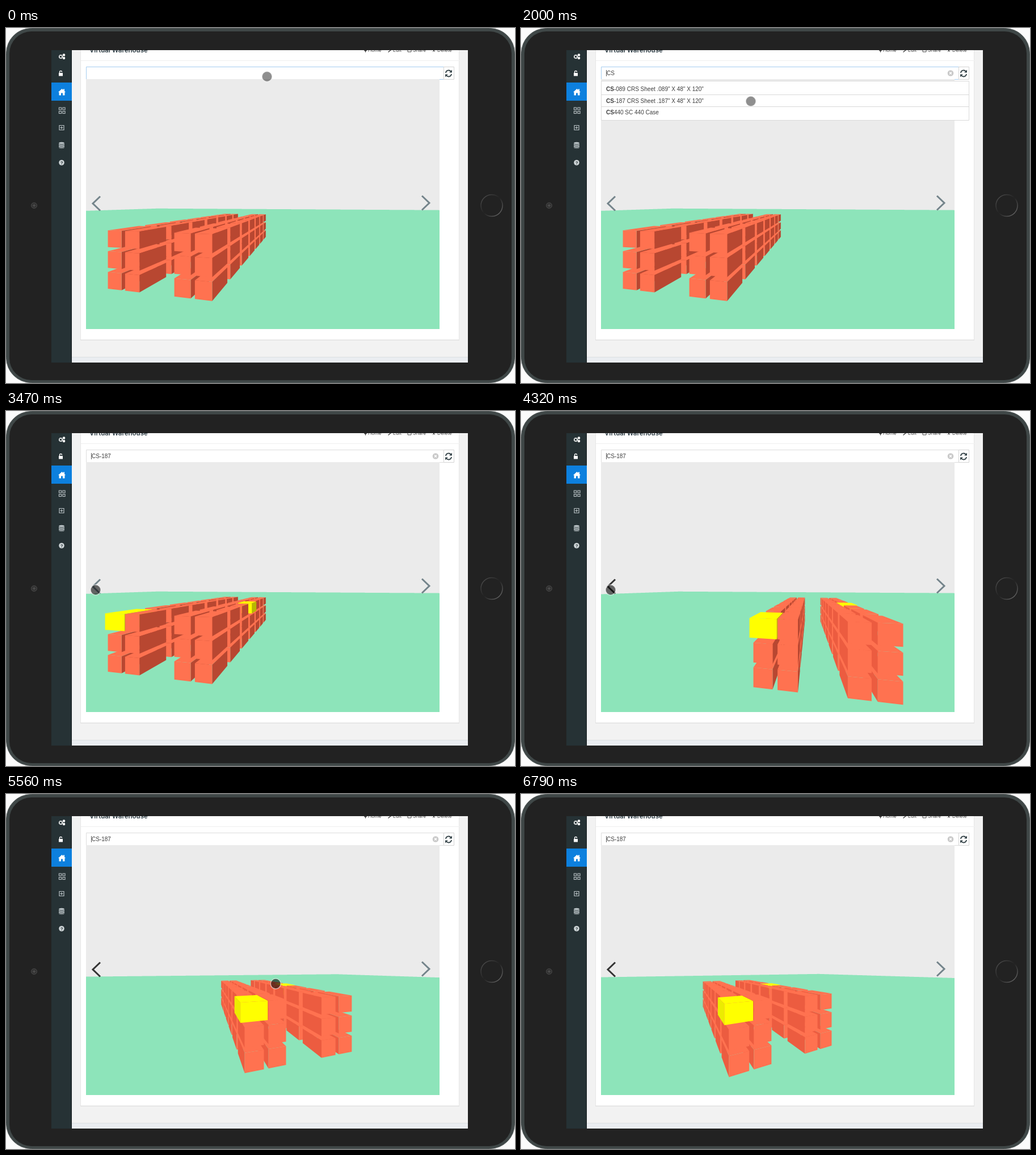
An HTML page with a canvas for the animation above (7.57 s loop, 897 by 625 pixels).

```html
<!DOCTYPE html>
<html lang="en">
<head>
<meta charset="utf-8">
<title>Virtual Warehouse</title>
<style>
  html, body { margin: 0; width: 100%; height: 100%; overflow: hidden; background: #fbfbfb; }
  svg, canvas { position: absolute; left: 0; top: 0; }
  canvas { left: 141px; top: 90px; }
  text { font: 10px "Liberation Sans", Arial, sans-serif; fill: #3c3c3c; }
  .title { font: 600 11.5px Inter, sans-serif; fill: #2b3a42; }
  .menu { font: 8.5px Inter, sans-serif; fill: #444; }
  .line { fill: none; stroke: #b9c2c5; stroke-width: 1.2; }
  .chevron { fill: none; stroke: #74848b; stroke-width: 3; }
</style>
</head>
<body>
<svg width="897" height="625">
  <defs>
    <clipPath id="screen"><path d="M80 39h734v550H80z"/></clipPath>
    <linearGradient id="knob" x2="0" y2="1">
      <stop stop-color="#333"/><stop offset=".5" stop-color="#555"/>
      <stop offset=".65" stop-color="#ddd"/><stop offset="1" stop-color="#777"/>
    </linearGradient>
    <linearGradient id="ring" x2="1" y2="1">
      <stop stop-color="#555"/><stop offset=".5" stop-color="#222"/><stop offset="1" stop-color="#777"/>
    </linearGradient>
  </defs>
  <!-- tablet -->
  <path fill="url(#knob)" d="M0 130h5v55H0zM892 430h5v55h-5z"/>
  <rect x=".5" y=".5" width="896" height="624" rx="44" fill="#3f4747" stroke="#565d5d"/>
  <rect x="6" y="6" width="885" height="614" rx="39" fill="#222"/>
  <circle cx="49.5" cy="312.5" r="5" fill="#333" stroke="#494949"/>
  <path d="M47 312.500h5M49.500 310v5" stroke="#555"/>
  <circle cx="856" cy="312.500" r="19" fill="none" stroke="url(#ring)" stroke-width="1.500"/>
  <!-- page -->
  <g clip-path="url(#screen)">
    <path fill="#f2f2f2" d="M80 39h734v550H80z"/>
    <path fill="#eaedf1" d="M116 579h698v10H116z"/>
    <path stroke="#dcdfe2" d="M116 579.500h698"/>
    <path fill="#fff" stroke="#e6e6e6" d="M131.500 30h667v519h-667z"/>
    <path stroke="#dedede" d="M131 549.500h668"/>
    <path stroke="#efefef" d="M132 57.500h667"/>
    <text class="title" x="147" y="43">Virtual Warehouse</text>
    <g class="menu">
      <text class="menu" x="638" y="42">Home</text><text class="menu" x="682" y="42">Edit</text>
      <text class="menu" x="717" y="42">Share</text><text class="menu" x="760" y="42">Delete</text>
      <path fill="#444" d="M631 39h5l-1 2h-1v2h-1v-2h-1zM673 42l5-4 1 1-5 4z"/>
      <path fill="none" stroke="#444" d="M708 38v4h6v-3M752 38l4 4M756 38l-4 4"/>
    </g>
    <!-- sidebar -->
    <path fill="#263235" d="M80 39h36v550H80z"/>
    <path stroke="#151c1e" d="M115.500 39v550"/>
    <path fill="#0d80de" d="M80 96h36v32H80z"/>
    <g fill="none" stroke="#fff" stroke-width="2">
      <circle cx="96.500" cy="50.500" r="2.700" stroke-dasharray="1.700 .4"/>
      <circle cx="102" cy="47.500" r="1.300"/><circle cx="102" cy="53" r="1.300"/>
    </g>
    <path fill="#fff" d="M93 79h7v5.500h-7z"/>
    <path d="M94.500 79v-1.500a2 2 0 0 1 4 0" fill="none" stroke="#fff" stroke-width="1.300"/>
    <path fill="#fff" d="M92 113l6.500-6 2.500 2v-1.500h2v3.500l2 2h-1.500v5.500h-3.500v-4h-3v4h-3.500V113z"/>
    <path class="line" d="M93.500 140h4v4h-4zM100 140h4v4h-4zM93.500 146.500h4v4h-4zM100 146.500h4v4h-4z"/>
    <path class="line" d="M94 171.500h8v8h-8zM98 173v5M95.500 175.500h5"/>
    <path fill="#b9c2c5" d="M93 203c0-3 10-3 10 0v7c0 3-10 3-10 0z"/>
    <path fill="none" stroke="#263235" d="M93 203.500c1 2 9 2 10 0M93 206.500c1 2 9 2 10 0M93 209.500c1 2 9 2 10 0"/>
    <circle cx="98" cy="237" r="4.800" fill="#cfd6d8"/>
    <text x="95.700" y="240" style="font-size:8px;font-weight:700;fill:#263235">?</text>
    <!-- search bar -->
    <path id="field" fill="#fff" d="M141.500 68.500h630v22h-630z"/>
    <path fill="#fff" stroke="#d4d4d4" d="M771.500 68.500h18v22h-18z"/>
    <g fill="none" stroke="#39474c" stroke-width="1.900">
      <path d="M775 79a5 5 0 0 1 9-2.500M785 81a5 5 0 0 1-9 2.500"/>
    </g>
    <path fill="#39474c" d="M786 73.500v5h-5zM774 86.500v-5h5z"/>
    <path id="caret" stroke="#555" d="M150.500 74v11"/>
    <text id="query" x="151" y="83"></text>
    <g id="clear">
      <circle cx="757" cy="79.500" r="5.300" fill="#c9c9c9"/>
      <path d="M755 77.500l4 4M759 77.500l-4 4" stroke="#fff" stroke-width="1.400"/>
    </g>
  </g>
</svg>
<canvas id="scene" width="623" height="440"></canvas>
<svg width="897" height="625">
  <path id="left" class="chevron" d="M166 296.500L153 309l13 12.500"/>
  <path class="chevron" d="M733 295.500L746 308l-13 12.500"/>
  <g id="menu">
    <path fill="#fff" stroke="#d9d9d9" d="M141.500 93.500h648v69h-648zM142 117.500h647M142 138.500h647"/>
    <text x="150" y="110.500"><tspan font-weight="700">CS</tspan>-089 CRS Sheet .089" X 48" X 120"</text>
    <text x="150" y="131.500"><tspan font-weight="700">CS</tspan>-187 CRS Sheet .187" X 48" X 120"</text>
    <text x="150" y="151.500"><tspan font-weight="700">CS</tspan>440 SC 440 Case</text>
  </g>
  <circle id="cursor" r="9" stroke="#fff" stroke-opacity=".55" stroke-width="1.500"/>
</svg>
<script>
const LOOP = 7570, FOCAL = 286.7, EYE = 5.08, BACK = 7.9;
const RED = { front: '#ff7250', left: '#ec5c40', right: '#b84731' };
const YELLOW = { front: '#ffff00', left: '#ecec00', right: '#b8b800' };
const $ = id => document.getElementById(id);
const ctx = $('scene').getContext('2d');
const show = (id, on) => $(id).style.display = on ? '' : 'none';
const mix = (a, b, p) => a + (b - a) * p;
const smooth = p => p * p * (3 - 2 * p);

// Progress 0..1 in n equal jumps, the first at a and the last at b
const steps = (t, a, b, n) =>
  t < a ? 0 : Math.min(1, (Math.floor((t - a) * (n - 1) / (b - a) + 1e-6) + 1) / n);

// Fast swipe that slows down at the end
function swipe(t) {
  const p = steps(t, 5330, 6020, 10);
  if (!p) return 0;
  return p < 0.4 ? 0.11 + (p - 0.1) * 2.08 : 1 - 0.265 * ((1 - p) / 0.6) ** 3;
}

const columns = [-2.25, -1, 2.27, 3.52].map((x, id) => ({ x, id }));

function drawScene(camX, yaw, found) {
  const s = Math.sin(yaw), c = Math.cos(yaw);
  const project = ([x, y, z]) => {
    const dx = x - camX, dz = z + BACK, depth = dz * c - dx * s;
    return [311.5 + FOCAL * (dx * c + dz * s) / depth, 220 + FOCAL * y / depth];
  };
  const face = (color, ...points) => {
    ctx.fillStyle = color;
    ctx.beginPath();
    points.forEach(p => ctx.lineTo(...project(p)));
    ctx.fill();
  };
  const box = (x0, x1, y0, z0, paint) => {
    const y1 = y0 + 1, z1 = z0 + 2;
    const side = (x, color) => face(color, [x, y0, z0], [x, y0, z1], [x, y1, z1], [x, y1, z0]);
    face(paint.front, [x0, y0, z0], [x1, y0, z0], [x1, y0, z1], [x0, y0, z1]);
    if (camX < x0) side(x0, paint.left);
    if (camX > x1) side(x1, paint.right);
    face(paint.front, [x0, y0, z0], [x1, y0, z0], [x1, y1, z0], [x0, y1, z0]);
  };

  ctx.fillStyle = '#ebebeb';
  ctx.fillRect(0, 0, 623, 440);

  // Floor: a finite square, its far edge found along each view ray
  ctx.fillStyle = '#8de4ba';
  ctx.beginPath();
  ctx.moveTo(0, 440);
  for (let px = 0; px <= 623; px++) {
    const k = (px - 311.5) / FOCAL, rx = k * c - s, rz = k * s + c;
    const depth = Math.min(162 / rz, (145 * Math.sign(rx) - camX) / rx);
    ctx.lineTo(px, 220 + FOCAL * EYE / depth);
  }
  ctx.lineTo(623, 440);
  ctx.fill();

  // Back to front: far columns, far boxes, low levels first
  const far = col => Math.abs(col.x + 0.5 - camX);
  for (const { x, id } of [...columns].sort((a, b) => far(b) - far(a)))
    for (let i = 6; i >= 0; i--)
      for (let level = 2; level >= 0; level--) {
        const hit = found && !level && (id === 0 && i === 0 || id === 3 && i === 3);
        const grow = hit ? 0.21 : 0;
        box(x - grow, x + 1 + grow, 1.58 + level * 1.25, i * 2.5, hit ? YELLOW : RED);
      }
}

function moveCursor(t) {
  const path = [
    [steps(t, 1680, 2000, 5), 405, 129],
    [steps(t, 2930, 3470, 8), 158, 315],
    [steps(t, 4935, 5160, 4), 372, 338.3]
  ];
  let x = 460, y = 85.5;
  for (const [p, tx, ty] of path) {
    x = mix(x, tx, smooth(p));
    y = mix(y, ty, smooth(p));
  }
  const drag = swipe(t), leave = smooth(steps(t, 6480, 6790, 5));
  x += 140.5 * drag + 281 * leave;
  y += -5.8 * drag + 330 * leave;
  const pressed = t >= 760 && t < 1680 || t >= 2400 && t < 2480;
  const cursor = $('cursor');
  cursor.setAttribute('cx', x);
  cursor.setAttribute('cy', y);
  cursor.setAttribute('r', pressed ? 6.5 : 9);
  cursor.setAttribute('fill-opacity', t >= 3470 && t < 4935 || drag > 0.3 ? 0.58 : 0.44);
  show('cursor', leave < 1);
}

function draw(now) {
  const t = now % LOOP, found = t >= 2480;
  const camX = t < 3790 ? 8.7 : t < 4320 ? 4.6 : t < 4860 ? 0.49 : -3.9;
  drawScene(camX, (10.6 - 39.1 * swipe(t)) * Math.PI / 180, found);
  $('query').textContent = t < 920 ? '' : t < 1450 ? 'C' : found ? 'CS-187' : 'CS';
  show('caret', t >= 380);
  show('clear', t >= 920);
  show('menu', t >= 1450 && !found);
  $('field').style.stroke = found ? '#dcdcdc' : '#a6cdf0';
  $('left').style.stroke = t < 3790 ? '#74848b' : '#333';
  moveCursor(t);
}

const start = performance.now();
(function tick() {
  draw(performance.now() - start);
  requestAnimationFrame(tick);
})();
</script>
</body>
</html>
```
